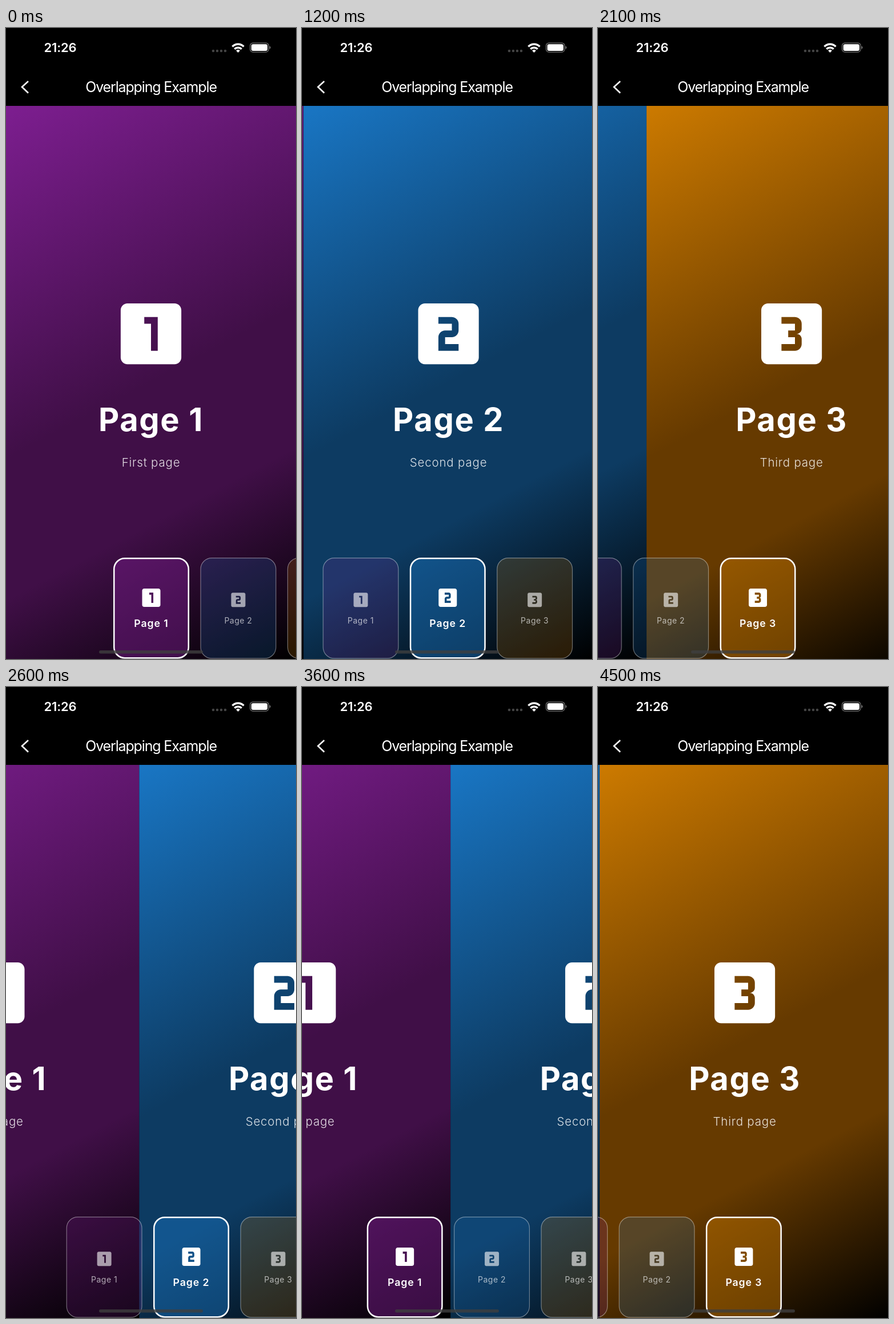
These frames come from a looping animation (508x1102 px, 4600 ms). An HTML page:

```html
<!DOCTYPE html>
<html lang="en">
<head>
<meta charset="utf-8">
<title>Overlapping Example</title>
<style>
  html, body { margin: 0; width: 100%; height: 100%; overflow: hidden; background: #000; }
  svg { display: block; width: 508px; height: 1102px; }
  text { font-family: Inter, Roboto, sans-serif; text-anchor: middle; fill: #fff; }
  .time { font-size: 22px; font-weight: 600; letter-spacing: -.2px; }
  .bar { font-size: 25px; letter-spacing: -1.15px; }
  .title { font-size: 56px; font-weight: 700; letter-spacing: 1.6px; }
  .sub { font-size: 20.5px; font-weight: 300; letter-spacing: .8px; fill-opacity: .85; }
  .label { font-size: 14px; letter-spacing: .5px; }
  .on .label { font-size: 17.7px; font-weight: 600; letter-spacing: .9px; }
</style>
</head>
<body>
<svg viewBox="0 0 508 1102">
  <defs id="defs"></defs>
  <g id="pages"></g>
  <g id="cards"></g>
  <rect x="163" y="1087" width="182" height="5.5" rx="2.75" fill="#3f3f3f" opacity=".8"/>
  <rect width="508" height="136"/>
  <text class="time" x="95" y="42">21:26</text>
  <text class="bar" x="254" y="112">Overlapping Example</text>
  <path d="M39 93L28 103l11 10.5" fill="none" stroke="#fff" stroke-width="2.6"/>
  <path d="M363 40h.01M370 40h.01M377 40h.01M384 40h.01" stroke="#444" stroke-width="4.6" stroke-linecap="round"/>
  <g fill="none" stroke="#fff" stroke-width="3.4">
    <path d="M396.5 32.5a14 14 0 0 1 20 0M400.3 36.8a9 9 0 0 1 12.4 0"/>
    <path d="M406.5 43l-3.4-3.6a5 5 0 0 1 6.8 0z" fill="#fff" stroke="none"/>
  </g>
  <rect x="427.6" y="26.1" width="32.5" height="16" rx="5" fill="none" stroke="#777" stroke-width="1.3"/>
  <rect x="429.7" y="28.2" width="28.3" height="11.8" rx="3.2" fill="#fff"/>
  <path d="M461.6 31.5q2 .6 2 2.6t-2 2.6z" fill="#777"/>
</svg>
<script>
const W = 508, STEP = W * 0.3, LOOP = 4600, FRAME = 100;
const $ = id => document.getElementById(id);

const box = 'M19 3H5c-1.1 0-2 .9-2 2v14c0 1.1.9 2 2 2h14c1.1 0 2-.9 2-2V5c0-1.1-.9-2-2-2z';
const pages = [
  { sub: 'First page', top: '#7d1e90', mid: '#400f47', digit: 'M14 17h-2V9h-2V7h4z' },
  { sub: 'Second page', top: '#1976c4', mid: '#0d3b62',
    digit: 'M15 11c0 1.1-.9 2-2 2h-2v2h4v2H9v-4c0-1.1.9-2 2-2h2V9H9V7h4c1.1 0 2 .9 2 2z' },
  { sub: 'Third page', top: '#cc7a00', mid: '#663a00',
    digit: 'M15 10.5c0 .83-.67 1.5-1.5 1.5.83 0 1.5.67 1.5 1.5V15c0 1.1-.9 2-2 2H9v-2h4v-2h-2v-2h2V9H9V7h4c1.1 0 2 .9 2 2z' }
];

const icon = (page, y, size, alpha = 1) =>
  `<path transform="translate(0 ${y}) scale(${size / 18}) translate(-12 -12)"
    d="${box}${page.digit}" fill="#fff" fill-rule="evenodd" opacity="${alpha}"/>`;

const gradient = (page, i) =>
  `<linearGradient id="bg${i}" gradientUnits="userSpaceOnUse" x1="-254" y1="136" x2="254" y2="1102">
    <stop stop-color="${page.top}"/><stop offset=".5" stop-color="${page.mid}"/>
    <stop offset=".7" stop-color="${page.mid}"/><stop offset="1"/></linearGradient>`;

const pageView = (page, i) =>
  `<g><rect x="-254" y="136" width="508" height="966" fill="url(#bg${i})"/>
    ${icon(page, 534.2, 106.2)}
    <text class="title" y="704">Page ${i + 1}</text>
    <text class="sub" y="766">${page.sub}</text></g>`;

const cardFace = (page, i, on) => {
  const line = on ? 2.5 : 1.2, half = 66.5 - line / 2;
  return `<g class="${on ? 'on' : 'off'}">
    <rect x="${-half}" y="${925 + line / 2}" width="${half * 2}" height="${176.5 - line}" rx="${20 - line / 2}"
      fill="${page.top}" fill-opacity="${on ? .45 : .2}"
      stroke="#fff" stroke-opacity="${on ? 1 : .4}" stroke-width="${line}"/>
    ${on ? icon(page, 995, 32) : icon(page, 998.7, 25, .6)}
    <text class="label" y="${on ? 1046 : 1040}" opacity="${on ? 1 : .65}">Page ${i + 1}</text></g>`;
};

$('defs').innerHTML = pages.map(gradient).join('');
$('pages').innerHTML = pages.map(pageView).join('');
$('cards').innerHTML = pages.map((p, i) =>
  `<g>${cardFace(p, i, false)}${cardFace(p, i, true)}</g>`).join('');

// Swipes settle like a damped spring; taps ease in and out and stop a hair short.
const swipe = rate => ms => {
  const x = rate * ms / 1000;
  return 1 - (1 + x) * Math.exp(-x);
};
const tap = ms => {
  const x = Math.min(ms / 431, 1);
  return Math.min(x * x * (3 - 2 * x), 0.994);
};
const moves = [
  { at: 0, from: 0, to: 0, ease: tap },
  { at: 583, from: 0, to: 1, ease: swipe(12) },
  { at: 1429, from: 1, to: 2, ease: swipe(12) },
  { at: 1988, from: 2, to: 1, ease: tap },
  { at: 2503, from: 1, to: 0, ease: swipe(16) },
  { at: 3388, from: 0, to: 1, ease: tap },
  { at: 4088, from: 1, to: 2, ease: tap }
];

function position(t) {
  const m = moves.filter(move => move.at <= t).pop();
  return m.from + (m.to - m.from) * m.ease(t - m.at);
}

function draw(t) {
  const pos = position(t), active = Math.round(pos);
  pages.forEach((_, i) => {
    const card = $('cards').children[i];
    $('pages').children[i].setAttribute('transform', `translate(${254 + (i - pos) * W})`);
    card.setAttribute('transform', `translate(${254.5 + (i - pos) * STEP})`);
    card.children[0].style.display = i === active ? 'none' : '';
    card.children[1].style.display = i === active ? '' : 'none';
  });
}

const start = performance.now();
function tick() {
  const t = (performance.now() - start) % LOOP;
  draw(Math.floor(t / FRAME) * FRAME);
  requestAnimationFrame(tick);
}
tick();
</script>
</body>
</html>
```
